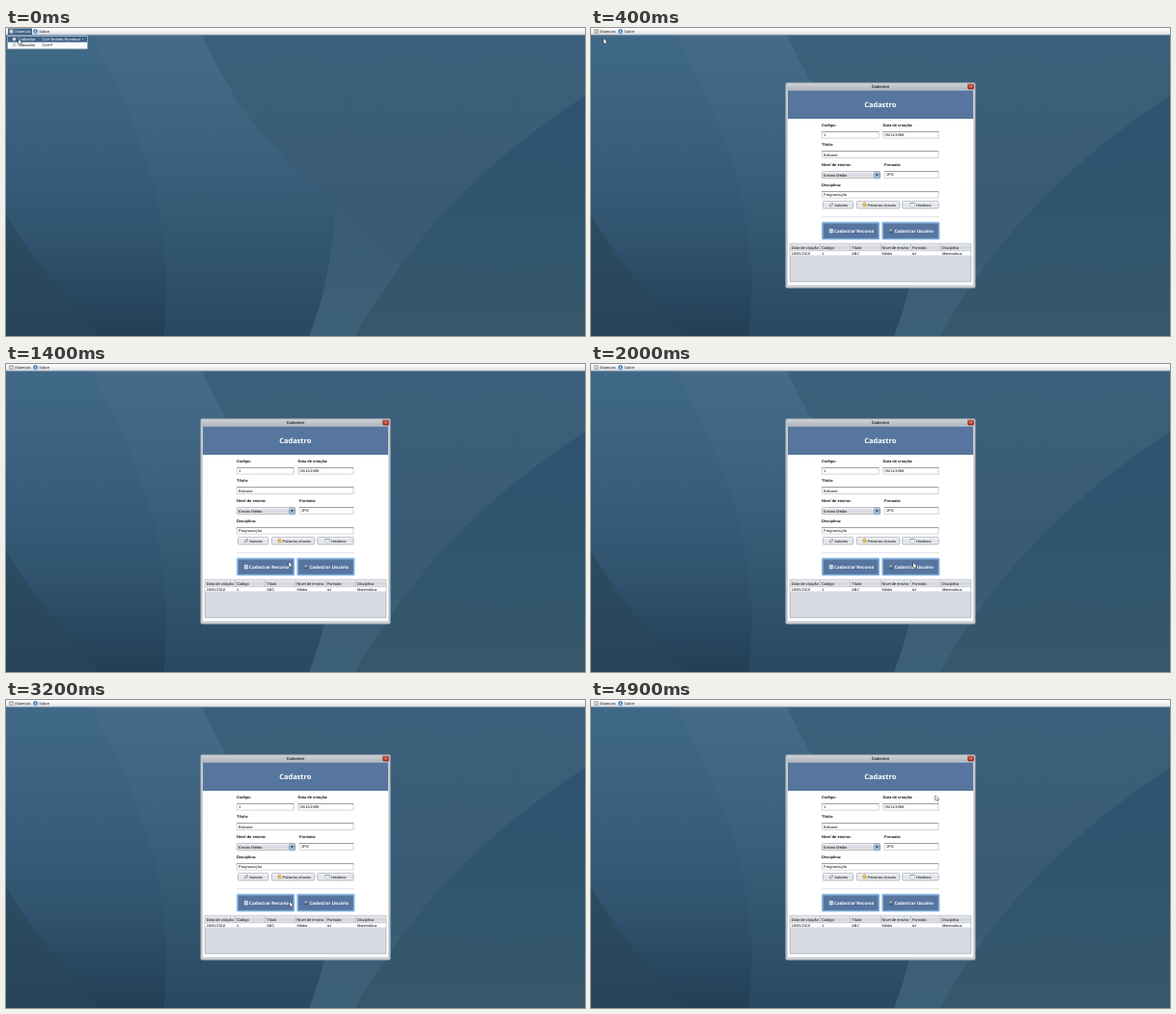
Animation of 600x319 px, one loop 5 s. Source, as an HTML page with a canvas:

```html
<!DOCTYPE html>
<html lang="pt">
<head>
<meta charset="utf-8">
<title>Cadastro</title>
<style>
html, body { margin: 0; width: 100%; height: 100%; overflow: hidden; background: #3b5d78; }
canvas { display: block; }
</style>
</head>
<body>
<canvas id="stage" width="600" height="319"></canvas>
<script>
const ctx = document.getElementById('stage').getContext('2d');
ctx.textRendering = 'geometricPrecision';
const UI = '"Liberation Sans", Arial, sans-serif';
const HEAD = '"Open Sans", "Noto Sans", sans-serif';
const LOOP = 5000, MENU_CLOSES = 180, DIALOG_OPENS = 370;

// time, x, y of the pointer tip
const route = [
  [0, 13, 12], [300, 13, 11], [700, 13, 11], [1300, 292, 205], [1400, 293, 205],
  [1900, 334, 206], [2400, 334, 207], [3000, 294, 209], [3600, 294, 209],
  [4100, 379, 76.5], [4400, 379, 77], [4900, 357, 99]
];

function vgrad(y0, y1, ...colors) {
  const g = ctx.createLinearGradient(0, y0, 0, y1);
  colors.forEach((c, i) => g.addColorStop(i / (colors.length - 1), c));
  return g;
}

function rect(x, y, w, h, fill) {
  ctx.fillStyle = fill;
  ctx.fillRect(x, y, w, h);
}

function box(x, y, w, h, fill, line, r = 0, lw = 0.6) {
  ctx.beginPath();
  ctx.roundRect(x, y, w, h, r);
  ctx.fillStyle = fill;
  ctx.fill();
  ctx.strokeStyle = line;
  ctx.lineWidth = lw;
  ctx.stroke();
}

function shape(d, fill) {
  ctx.fillStyle = fill;
  ctx.fill(new Path2D(d));
}

function dot(x, y, r, fill) {
  ctx.beginPath();
  ctx.arc(x, y, r, 0, 7);
  ctx.fillStyle = fill;
  ctx.fill();
}

function text(s, x, y, { size = 4, color = '#111', bold = false, font = UI, align = 'left' } = {}) {
  ctx.font = `${bold ? 'bold ' : ''}${size}px ${font}`;
  ctx.textAlign = align;
  ctx.fillStyle = color;
  ctx.fillText(s, x, y);
}

function wallpaper() {
  rect(0, 0, 600, 319, vgrad(8, 319, '#3c607b', '#395b76', '#395a70'));
  shape('M600 70Q481 147 408 247Q380 285 362 319H600Z',
    vgrad(70, 319, '#2f5370', '#30556e', '#36586a'));
  shape('M342 184L408 247Q380 285 362 319H314Q337 262 342 184Z',
    vgrad(184, 319, '#3a5c76', '#3c6077'));
  shape('M88 7H203Q238 84 282 128Q312 157 342 182Q337 262 314 319H150V150Z',
    vgrad(7, 319, '#456b88', '#3d637f', '#335771', '#294861'));
  shape('M0 7H88C116 58 150 130 160 196S166 275 164 319H0Z',
    vgrad(7, 319, '#406887', '#3a607f', '#31546f', '#223f56'));
  shape('M0 193Q40 258 95 319H0Z', vgrad(193, 319, '#2c4d62', '#274357'));
}

function listIcon(x, y, fill) {
  box(x, y, 4, 4, fill, '#75797e', 0.4, 0.5);
  rect(x + 0.8, y + 1.2, 2.4, 0.4, '#85888c');
  rect(x + 0.8, y + 2.4, 2.4, 0.4, '#85888c');
}

function menuBar(open, warm) {
  rect(0, 0, 600, 7, vgrad(0, 7, '#ffffff', '#f0f1f3', '#dde0e5'));
  rect(0, 6.7, 600, 0.8, '#9ba8b5');
  if (open) rect(2, 0.4, 25, 6.6, '#3d6186');
  listIcon(3.5, 1.5, warm ? '#e4d9ac' : '#e0e3e5');
  text('Materiais', 9.3, 5.1, { color: open ? '#fff' : '#222' });
  dot(30.5, 3.5, 2.4, '#3d83bd');
  rect(30.1, 2.8, 0.8, 2.2, '#fff');
  rect(30.1, 1.7, 0.8, 0.7, '#fff');
  text('Sobre', 34.3, 5.1, { color: '#222' });
}

function dropDown() {
  box(1.5, 7.8, 83, 14, '#fafbfc', '#8995a3');
  rect(2, 8.5, 82, 6.2, '#3d6186');
  dot(8.5, 11.6, 1.8, '#c7d6df');
  text('Cadastrar', 13, 13, { color: '#fff' });
  text('Ctrl+Teclado Numérico +', 37.6, 13, { size: 3.9, color: '#fff' });
  ctx.strokeStyle = '#8d9aa8';
  ctx.lineWidth = 0.7;
  ctx.beginPath();
  ctx.arc(8.8, 17.2, 1.3, 0, 7);
  ctx.moveTo(7.8, 18.2);
  ctx.lineTo(6.6, 19.5);
  ctx.stroke();
  text('Consultar', 13, 19);
  text('Ctrl+P', 37.6, 19, { size: 3.9 });
}

function field(label, value, x, y, w) {
  text(label, x, y - 5.3, { bold: true });
  box(x + 0.3, y + 0.3, w - 0.6, 6.8, '#fff', '#b4b8bf');
  rect(x, y, w, 0.7, '#83878e');
  text(value, x + 2, y + 5.1);
}

function combo(label, value, x, y, w) {
  text(label, x, y - 5.3, { bold: true });
  box(x + 0.3, y + 0.3, w - 0.6, 7.2, vgrad(y, y + 8, '#f6f7f9', '#d5d9df', '#e6e9ed'), '#9a9fa7', 1);
  box(x + w - 6.6, y + 0.3, 6, 7.2, vgrad(y, y + 8, '#c3d3e1', '#93adc6', '#b3c8da'), '#7f95ab', 1, 0.5);
  shape(`M${x + w - 5} ${y + 3}h2.8l-1.4 2.1z`, '#1f2b38');
  text(value, x + 2, y + 5.4);
}

function button(label, x, w, tx) {
  box(x + 0.3, 179.3, w - 0.6, 7.6, vgrad(179, 187, '#fdfdfe', '#dfe2e7', '#eff1f4'), '#8f949d', 1.2);
  text(label, tx, 184.6);
}

function bigButton(label, x) {
  box(x + 0.8, 201.6, 58.4, 16.9, '#56759f', '#85b3df', 0.6, 1.6);
  text(label, x + 13, 211.7, { size: 4.5, bold: true, font: HEAD, color: '#fff' });
}

function smallIcons() {
  ctx.strokeStyle = '#767b82';
  ctx.lineWidth = 0.8;
  ctx.beginPath();
  ctx.ellipse(249, 183.1, 2.2, 1, -0.9, 0, 7);
  ctx.stroke();
  ctx.strokeStyle = '#a58d4c';
  ctx.beginPath();
  ctx.arc(283.3, 182, 1.2, Math.PI, 0);
  ctx.stroke();
  rect(281.5, 182, 3.7, 3.1, '#e3b64b');
  box(330.6, 181, 4.8, 4, '#eef5fb', '#9db4c8', 0, 0.5);
  rect(330.6, 181, 4.8, 1.2, '#8fb2d0');
  box(247, 208, 3.8, 4.2, '#e9edf1', '#9eb3c7', 0, 0.5);
  rect(247.7, 209.2, 2.4, 0.5, '#799bbd');
  rect(247.7, 210.5, 2.4, 0.5, '#799bbd');
  dot(310.6, 209.2, 1, '#d8c1a4');
  shape('M309 212.2q1.6 -2.8 3.4 0z', '#3f4d60');
}

function table() {
  const heads = ['Data de criação', 'Codigo', 'Título', 'Nível de ensino', 'Formato', 'Disciplina'];
  const cells = ['18/05/2018', '1', 'ABC', 'Médio', 'txt', 'Matemática'];
  box(206.2, 223.3, 187.6, 39.5, '#d7dae1', '#8f959e');
  rect(206.5, 223.6, 187, 7.4, vgrad(223, 231, '#f4f5f7', '#d2d6dc', '#e2e5e9'));
  rect(206.5, 230.7, 187, 0.5, '#a2a7af');
  rect(206.5, 231.2, 187, 4.2, '#fff');
  heads.forEach((h, i) => {
    const x = 207.7 + 31.25 * i;
    if (i) rect(x - 1.6, 223.6, 0.5, 7.3, '#a1a6af');
    text(h, x, 228.7);
    text(cells[i], x, 234.7, { size: 3.9 });
  });
}

function dialog() {
  box(202, 57, 196, 212, '#cdd1d6', '#aeb4bb', 1, 1);
  rect(203, 57.6, 194, 7, vgrad(57, 65, '#cfd2d6', '#aeb3b9'));
  text('Cadastrar', 300, 62.4, { bold: true, align: 'center', color: '#252a30' });
  box(390.5, 58.2, 6.2, 5, vgrad(58, 63, '#d2513f', '#a32b20'), '#842a22', 1, 0.5);
  ctx.strokeStyle = '#f4dcd7';
  ctx.lineWidth = 0.6;
  ctx.stroke(new Path2D('M392.6 59.7l2 2m0 -2l-2 2'));
  rect(204, 64.6, 192, 201.6, '#fff');
  rect(204, 64.6, 192, 29.4, '#56769f');
  text('Cadastro', 299.8, 82, { size: 7.4, bold: true, font: HEAD, color: '#fff', align: 'center' });

  field('Codigo:', '1', 239, 107, 59.5);
  field('Data de criação:', '05/11/1988', 302.5, 107, 57.8);
  field('Título:', 'Bolvane', 239, 127.4, 121.3);
  combo('Nivel de ensino:', 'Ensino Médio', 239, 148.2, 61);
  field('Formato:', 'JPG', 304, 148.2, 56.3);
  field('Disciplina:', 'Programação', 239, 169, 121.3);

  button('Autores', 240, 32, 252.2);
  button('Palavras chaves', 275, 45, 286.6);
  button('Histórico', 322.4, 38, 337);
  rect(239, 195.4, 122, 0.6, '#d0d4d9');
  bigButton('Cadastrar Recurso', 239.1);
  bigButton('Cadastrar Usuário', 301.4);
  smallIcons();
  table();
}

function pointerAt(t) {
  const i = route.findIndex(p => p[0] > t);
  if (i < 0) return route[route.length - 1].slice(1);
  const [t0, x0, y0] = route[i - 1], [t1, x1, y1] = route[i];
  const u = (t - t0) / (t1 - t0), k = u * u * (3 - 2 * u);
  return [x0 + (x1 - x0) * k, y0 + (y1 - y0) * k];
}

function pointer([x, y]) {
  const arrow = new Path2D('M0 0V4.9L1.2 3.9L2 5.6L2.9 5.2L2.1 3.5H3.6Z');
  ctx.save();
  ctx.translate(x, y);
  ctx.strokeStyle = '#1a1e24';
  ctx.lineWidth = 0.9;
  ctx.lineJoin = 'round';
  ctx.stroke(arrow);
  ctx.fillStyle = '#fff';
  ctx.fill(arrow);
  ctx.restore();
}

function draw(t) {
  const open = t < MENU_CLOSES;
  wallpaper();
  menuBar(open, !open && t < 700);
  if (open) dropDown();
  if (t >= DIALOG_OPENS) dialog();
  pointer(pointerAt(t));
}

const start = performance.now();
function tick() {
  draw((performance.now() - start) % LOOP);
  requestAnimationFrame(tick);
}
tick();
</script>
</body>
</html>
```
